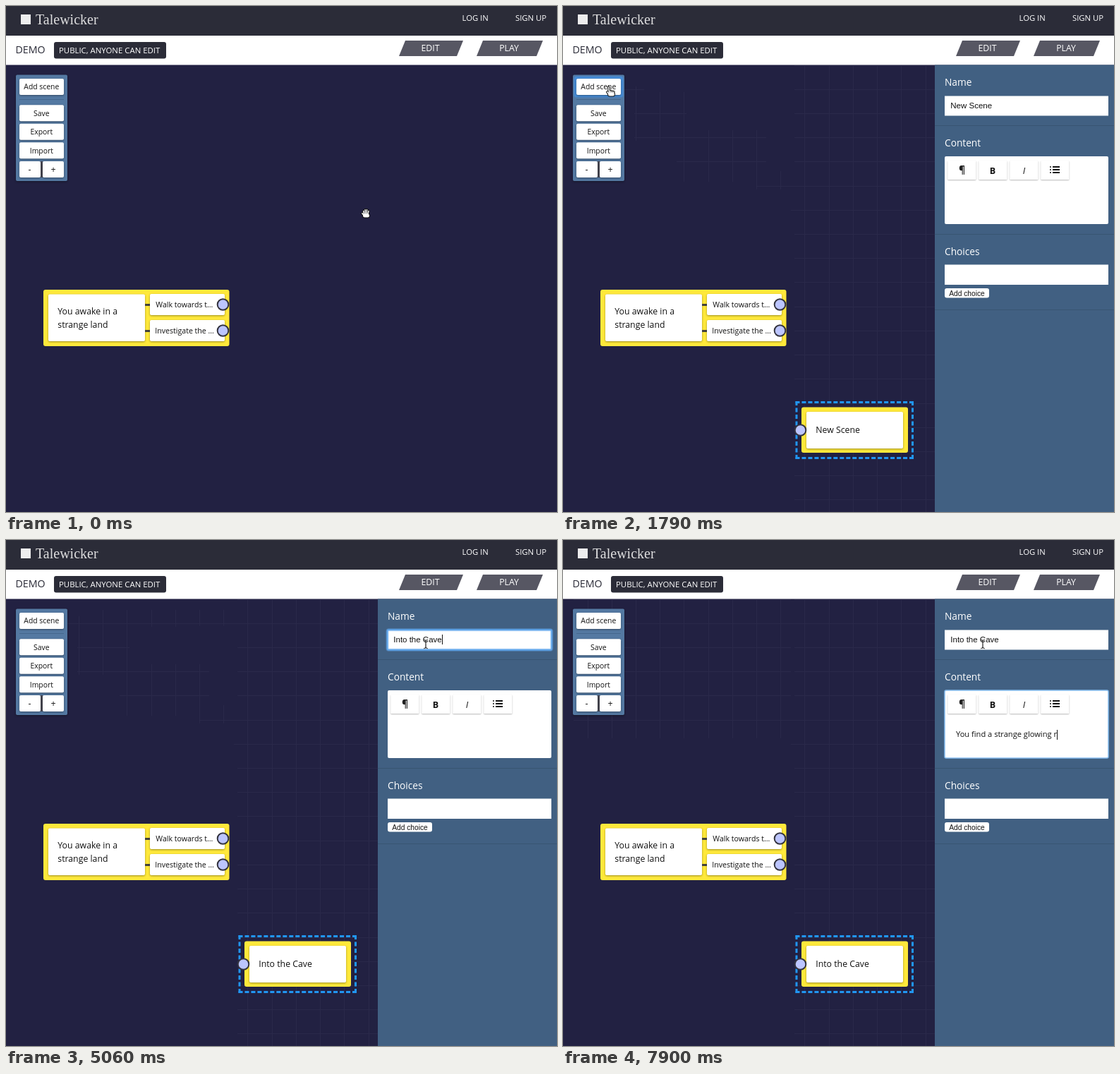
An HTML page with a canvas for the animation above (8000 ms loop, 781 by 717 pixels).

```html
<!DOCTYPE html>
<html lang="en">
<head>
<meta charset="utf-8">
<title>Scene editor</title>
<style>
html, body { margin: 0; width: 100%; height: 100%; overflow: hidden; background: #222142; }
canvas { display: block; }
</style>
</head>
<body>
<canvas id="stage" width="781" height="717"></canvas>
<script>
const c = document.getElementById('stage').getContext('2d');
const LOOP = 8000;
const STEP = 149; // ms between screen updates
const SANS = '"Open Sans", "Noto Sans", sans-serif';
const ARIAL = '"Liberation Sans", Arial, sans-serif';
const SERIF = '"Liberation Serif", Times, serif';
const INK = '#2b2c38';

// Steps at which the state of the page changes.
const CLICK = 11, OPEN = 12, NAME = 19, SELECT = 22, CONTENT = 35, REPAINT = 38;

const clamp = (v, lo, hi) => Math.min(hi, Math.max(lo, v));

// Linear interpolation through [step, value] keys.
function tween(k, keys) {
  for (let i = 1; i < keys.length; i++) {
    const [a, from] = keys[i - 1], [b, to] = keys[i];
    if (k <= b) return from + (to - from) * clamp((k - a) / (b - a), 0, 1);
  }
  return keys[keys.length - 1][1];
}

const typed = (s, k, keys) => s.slice(0, Math.floor(tween(k, keys) + .01));

function sceneName(k) {
  if (k <= SELECT) return 'New Scene';
  return typed('Into the Cave', k, [[22, 0], [23, 1], [28, 9], [30, 9], [34, 13]]);
}

const sentence = k => typed('You find a strange glowing r', k, [[37, 0], [41, 10], [53, 28]]);

// Flick to the button, then an arc over to the name field.
const flick = [[510, 293], [330, 252], [281, 241], [168, 183], [108, 129], [68, 121]];
function mouse(k) {
  if (k <= 13) return flick[clamp(k - 2, 0, flick.length - 1)];
  const u = clamp((k - 13) / 5, 0, 1), p = u * u * (3 - 2 * u);
  return [68 + 527 * p, 121 + 26 * p - 27 * Math.sin(Math.PI * p)];
}

function rect(x, y, x2, y2, color, r = 0) {
  c.fillStyle = color;
  c.beginPath();
  c.roundRect(x, y, x2 - x, y2 - y, r);
  c.fill();
}

function text(s, x, y, size, color, font = SANS, align = 'left', style = '') {
  c.font = `${style} ${size}px ${font}`;
  c.textAlign = align;
  c.fillStyle = color;
  c.fillText(s, x, y);
}

function shadowed(draw, color = 'rgba(0,0,0,.4)', blur = 3, dy = 1) {
  c.save();
  c.shadowColor = color;
  c.shadowBlur = blur;
  c.shadowOffsetY = dy;
  draw();
  c.restore();
}

function paper(x, y, x2, y2) {
  shadowed(() => rect(x, y, x2, y2, '#fff', 2));
}

function line(x, y, x2, y2, width, color) {
  c.strokeStyle = color;
  c.lineWidth = width;
  c.beginPath();
  c.moveTo(x, y);
  c.lineTo(x2, y2);
  c.stroke();
}

function port(x, y) {
  c.beginPath();
  c.arc(x, y, 7.8, 0, Math.PI * 2);
  c.fillStyle = '#bcc5ff';
  c.fill();
  c.strokeStyle = '#34343f';
  c.lineWidth = 2;
  c.stroke();
}

// The grid shows only where the board has been repainted: along the mouse, then in larger parts.
function grid(k) {
  c.save();
  c.beginPath();
  for (let i = 3; i <= Math.min(k, 18); i++) {
    const [x, y] = mouse(i - 1), [x2, y2] = mouse(i);
    c.rect(Math.min(x, x2) - 7, Math.min(y, y2) - 7, Math.abs(x2 - x) + 14, Math.abs(y2 - y) + 15);
  }
  if (k >= OPEN) c.rect(328, 84, 199, 633);
  if (k >= REPAINT) c.rect(15, 84, 308, 197);
  c.clip();
  c.fillStyle = '#2a294a';
  for (let i = 0; i < 19; i++) {
    const d = i * 34.22;
    c.fillRect(Math.round(34.5 + d), 84, 1, 633);
    c.fillRect(0, Math.round(83.5 + d), 527, 1);
  }
  c.restore();
}

function slanted(x, label, w) {
  c.fillStyle = '#575763';
  c.beginPath();
  c.moveTo(x + 9, 49);
  c.lineTo(x + w, 49);
  c.lineTo(x + w - 9, 71);
  c.lineTo(x, 71);
  c.fill();
  text(label, x + w / 2 - 1, 64, 12.3, '#fff', SANS, 'center');
}

function header() {
  rect(0, 0, 781, 42, INK);
  rect(0, 42, 781, 83.5, '#fff');
  rect(21, 12, 35, 26, '#ededee');
  text('Talewicker', 42, 26, 20, '#dededf', SERIF);
  text('LOG IN', 646.5, 21, 11.3, '#fff');
  text('SIGN UP', 722, 21, 11.3, '#fff');
  text('DEMO', 13.5, 66.5, 14.2, INK);
  rect(68, 51, 227, 74.5, INK, 3);
  text('PUBLIC, ANYONE CAN EDIT', 75, 66.7, 11.4, '#fff');
  slanted(557, 'EDIT', 91);
  slanted(667, 'PLAY', 94);
}

function toolbar(focused) {
  shadowed(() => rect(14, 97.5, 87, 248, '#5479a2', 2));
  rect(19, 132, 82, 133, '#45678d');
  if (focused) shadowed(() => rect(16, 100, 85, 129, '#468bd6', 3), '#468bd6', 3, 0);
  const button = (label, y) => {
    paper(19, y, 82, y + 23);
    text(label, 50.3, y + 15.2, 10.4, '#111', SANS, 'center');
  };
  button('Add scene', 103);
  ['Save', 'Export', 'Import'].forEach((label, i) => button(label, 140.3 + i * 26.5));
  rect(49, 220, 52, 243, '#4c4c57');
  paper(19, 220, 49, 243);
  paper(52, 220, 82, 243);
  text('-', 33.5, 236, 12.5, '#111', SANS, 'center');
  text('+', 67, 236, 12.5, '#111', SANS, 'center');
}

function choice(s, x, y) {
  rect(197, y - 1, 204, y + 2, '#44433a');
  paper(204, y - 15, 310, y + 15);
  text(s, x, y + 4.3, 10.6, '#111');
  port(307.5, y);
}

function firstCard() {
  rect(53, 402, 316.5, 482, '#ffe93b', 3);
  paper(60, 408.5, 197, 475);
  text('You awake in a', 73.3, 437, 12.3, '#111');
  text('strange land', 73.3, 455.5, 12.3, '#111');
  choice('Walk towards t…', 212.3, 423);
  choice('Investigate the …', 211.3, 460);
}

// Dashes spread so that the side begins and ends with a whole one.
function dashed(x, y, x2, y2) {
  const length = x2 - x + y2 - y, dash = 6;
  const gaps = Math.round((length - dash) / (dash + 3));
  c.setLineDash([dash, (length - dash) / gaps - dash]);
  line(x, y, x2, y2, 3, '#2196f3');
  c.setLineDash([]);
}

function newCard(name) {
  for (const y of [561.5, 640.5]) dashed(329.5, y, 497, y);
  for (const x of [331, 495.5]) dashed(x, 560, x, 642);
  rect(338, 568.5, 489, 633, '#ffe93b', 3);
  paper(345, 575, 482, 627);
  text(name, 358.3, 605.3, 12.3, '#111');
  port(336.5, 601);
}

function ring(x, y, x2, y2, width, color) {
  c.strokeStyle = color;
  c.lineWidth = width;
  c.beginPath();
  c.roundRect(x, y, x2 - x, y2 - y, 2);
  c.stroke();
}

function caret(s, x, y, size, font) {
  c.font = `${size}px ${font}`;
  const end = Math.round(x + c.measureText(s).width);
  rect(end, y, end + 1, y + 14, '#111');
}

function editorButtons() {
  for (let i = 0; i < 4; i++) {
    const x = 545.3 + i * 44;
    shadowed(() => rect(x, 219, x + 40, 246, '#fff', 1), 'rgba(0,0,0,.28)', 2);
  }
  text('¶', 565.5, 237, 14, '#222', SANS, 'center', 'bold');
  text('B', 609, 237.5, 12.5, '#111', SANS, 'center', 'bold');
  text('I', 653.5, 237.5, 12.5, '#111', SANS, 'center', 'italic');
  for (const y of [228, 232, 236]) {
    rect(690, y - 1, 692, y + 1, '#111', 1);
    rect(694, y - 1, 704, y + 1, '#111');
  }
}

function section(label, y, bottom) {
  text(label, 541, y, 13.7, '#fff', SANS, 'left', '500');
  rect(527, bottom, 781, bottom + 1, '#385572');
}

function sidebar(k, name) {
  rect(527, 83.5, 781, 717, '#416082');
  section('Name', 113, 169);
  section('Content', 198.5, 323);
  section('Choices', 352.5, 430);

  const naming = k >= NAME && k < CONTENT;
  rect(541, 127.5, 773, 155.5, '#fff');
  if (naming) {
    ring(540.5, 127.2, 773.5, 155.8, 4, 'rgba(95,165,234,.45)');
    ring(540.5, 127.2, 773.5, 155.8, 2, '#5fa5ea');
  }
  if (k === SELECT) rect(549, 134, 608, 148, '#b3d7fe');
  text(name, 549.3, 145.3, 11.5, '#111', ARIAL);
  if (naming && k !== SELECT) caret(k < SELECT ? 'New Sce' : name, 549.3, 134, 11.5, ARIAL);

  rect(541, 213, 773, 309, '#fff', 2);
  editorButtons();
  if (k >= CONTENT) {
    ring(541, 213, 773, 309, 1.5, '#86bdf0');
    text(sentence(k), 557, 279.3, 11.1, '#111');
    caret(sentence(k), 557, 269, 11.1, SANS);
  }
  rect(541, 366.5, 773, 395, '#fff');
  rect(541, 400, 604, 413.5, '#fff', 3);
  text('Add choice', 572.5, 410.5, 10.2, '#111', ARIAL, 'center');
}

// Fingers and palm: dark pass for the outline, white pass on top.
function hand(pointing) {
  for (const [extra, color] of [[2, '#111'], [0, '#fff']]) {
    line(-1.5, 4, 2.5, 4, 5 + extra, color);
    line(-5, 1, -2, 4.5, 1.8 + extra, color);
    for (let i = 0; i < 4; i++) {
      const x = -3.3 + i * 2.4;
      const tip = pointing ? (i ? -1 + i * .5 : -6) : -2.6 - 2 * Math.sin(i * Math.PI / 3);
      line(x, tip, x * .7, 3, 1.5 + extra, color);
    }
  }
}

function beam() {
  line(0, -5, 0, 6, 1.2, '#222');
  for (const side of [-2.5, 2.5]) {
    line(side, -5.7, 0, -4.5, 1, '#222');
    line(side, 6.7, 0, 5.5, 1, '#222');
  }
}

function cursor(k) {
  const [x, y] = mouse(k);
  c.save();
  c.lineCap = 'round';
  c.translate(x, y);
  if (x > 527) beam();
  else hand(x < 87);
  c.restore();
}

function draw(t) {
  const k = Math.floor(t / STEP + .15);
  rect(0, 0, 781, 717, '#222142');
  grid(k);
  header();
  toolbar(k >= CLICK && k < NAME);
  firstCard();
  if (k >= OPEN) {
    newCard(sceneName(k));
    sidebar(k, sceneName(k));
  }
  cursor(k);
}

const begin = performance.now();
function tick(now) {
  draw(Math.max(0, now - begin) % LOOP);
  requestAnimationFrame(tick);
}
draw(0);
requestAnimationFrame(tick);
</script>
</body>
</html>
```
